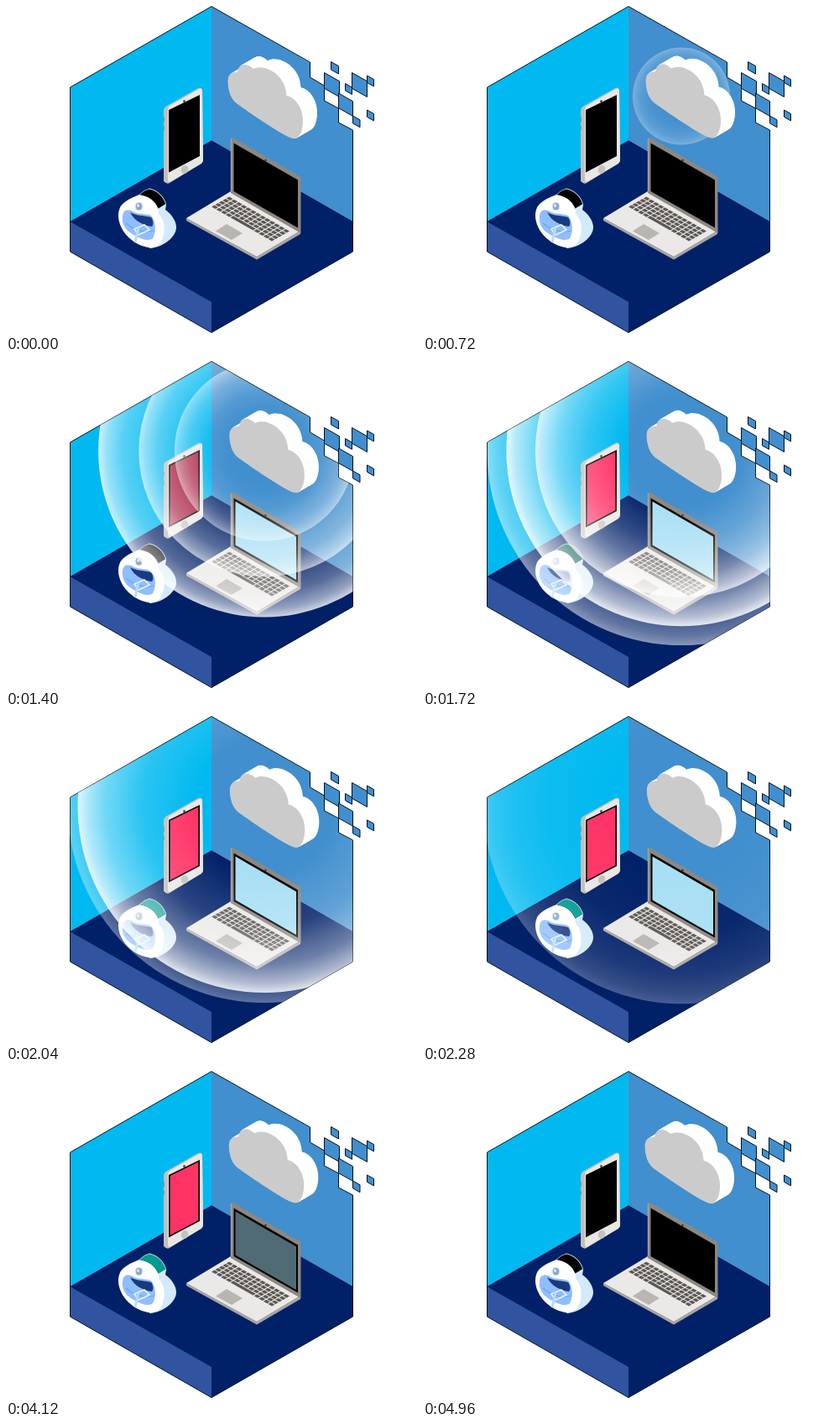
Animation, 490 px wide and 390 px high, one loop 5000 ms. Source, as an HTML page with a canvas:

```html
<!DOCTYPE html>
<html lang="en">
<head>
<meta charset="utf-8">
<title>Cloud and devices</title>
<style>
html, body { margin: 0; width: 490px; height: 390px; overflow: hidden; background: #fff; }
canvas { display: block; }
</style>
</head>
<body>
<canvas id="stage" width="490" height="390"></canvas>
<script>
const ctx = document.getElementById('stage').getContext('2d');
const LOOP = 5000;

const clamp = v => Math.max(0, Math.min(1, v));
const ramp = (t, from, to) => clamp((t - from) / (to - from));
const path = d => new Path2D(d);

function fill(shape, color, alpha = 1) {
  ctx.globalAlpha = alpha;
  ctx.fillStyle = color;
  ctx.fill(typeof shape === 'string' ? path(shape) : shape);
  ctx.globalAlpha = 1;
}

function line(shape, color, width = 1) {
  ctx.strokeStyle = color;
  ctx.lineWidth = width;
  ctx.stroke(typeof shape === 'string' ? path(shape) : shape);
}

function ellipse(x, y, rx, ry, color, turn = 0) {
  ctx.fillStyle = color;
  ctx.beginPath();
  ctx.ellipse(x, y, rx, ry, turn, 0, Math.PI * 2);
  ctx.fill();
}

// Black glass whose inner area lights up and goes dark again
function screen(glass, lit, color, t, on, off) {
  fill(glass, '#000');
  fill(lit, color, ramp(t, ...on) * (1 - ramp(t, ...off)));
}

const ROOM = path('M245 .5L362.5 67V85L379.5 95V113L396.5 122V139L413.5 148V293L245 389.5L76.5 293V97Z');
const CLOUD = path('M264.5 90C264.5 82 269 78 276 79C277 71 284 65 295 75C308 68 334 82 334.5 107' +
  'C346 109 355 124 354 139C353 153 348 161 339 157C328 153 290 127 276 117C268 112 264.5 100 264.5 90Z');

// x, y, width of the loose tiles beside the right wall
const TILES = [
  [387.5, 66.5, 9], [379.5, 79.5, 18], [412.5, 79.5, 18], [430.5, 83, 8],
  [404.5, 92.5, 8], [396.5, 104, 17], [430.5, 124, 8], [413.5, 131, 8.5]
];

function drawRoom() {
  ctx.save();
  ctx.clip(ROOM);
  fill('M245 0V160L76 257V97Z', '#00b9f0');
  fill('M245 0L414 97V257L245 160Z', '#418fce');
  fill('M245 160L414 257V293L245 390L76 257Z', '#002068');
  fill('M76 257L245 353V390L76 293Z', '#3054a0');
  ctx.restore();
  line(ROOM, '#001020');
  for (const [x, y, w] of TILES) {
    const tile = path(`M${x} ${y}l${w} ${w * .57}v${w * 1.04}l${-w} ${-w * .57}Z`);
    fill(tile, '#418fce');
    line(tile, '#001020');
  }
}

function drawPhone(t) {
  fill('M188 125Q188 121 192 119L229 98Q234 96 234 101L235 183Q235 187 231 189L195 211Q192 213 188 209Z', '#c3bfbb');
  fill('M193 124Q193 120 197 118L230 99Q234 97 234 102L235 183Q235 187 231 189L197 209Q193 211 193 207Z', '#e9e7e4');
  line('M188.5 132V138M188.5 143V148', '#96928e');
  screen('M194 124L231 106V179L194 198.5Z', 'M195.7 125L229.3 108.5V178L195.7 195.8Z',
    '#ff3366', t, [1120, 1540], [4200, 4620]);
  ellipse(212.5, 113.5, 1.3, 1.5, '#45413f');
  ellipse(213, 195, 4.2, 5, '#c5c1bd', .3);
}

function drawLaptop(t) {
  fill('M215 253L299 299L351 268V272L299 302.5L215 256Z', '#aaa5a1');
  fill('M268 221L351 268L299 299L215 253Z', '#ebe9e7');
  fill('M268 157L271 157L351.5 204V271L268 223Z', '#8d8782');
  line('M268.5 158V221', '#aaa49f', 1.4);
  screen('M271.5 163.5L348 207.5V264.5L271.5 221Z', 'M273.5 167.5L346 209.5V261L273.5 219.5Z',
    '#a9dff4', t, [780, 1180], [3880, 4340]);
  ellipse(309.5, 184, 1.2, 1.2, '#35312f');

  ctx.save();
  ctx.transform(73 / 13, 41.5 / 13, -22 / 5, 2.5, 266, 227);
  ctx.fillStyle = '#5c5753';
  for (let row = 0; row < 5; row++) {
    for (let col = 0; col < 13; col++) {
      const space = row === 4 && col > 3 && col < 9;
      if (space && col > 4) continue;
      ctx.fillRect(col + .1, row + .1, space ? 4.8 : .8, .78);
    }
  }
  ctx.restore();
  fill('M263 260L282 271L269 279L250 268.5Z', '#b9b5b1');
}

function drawWatch(t) {
  // strap side, front ring, inner strap, gap
  fill('M160 225L171 217.5C182 220 189 228 191 237L190 243C197 248 203 256 203 264C203 275 188 288 171 289Z', '#d2eafc');
  fill('M135 243C137 234 149 229 159 225C171 227 178 233 181.5 241.5L182 248C188 254 190 263 188 272' +
    'C186 283 180 289 170 288C156 286 142 275 137 263C134 256 133 249 135 243Z', '#fff');
  fill('M139 250C140 242 147 242 153 246C161 249 169 247 174 251C179 259 179 270 175 277' +
    'C168 283 152 274 144 267C140 262 138 257 139 250Z', '#8fbeff');
  fill('M148 246C154 250 165 250 173 252C176 256 176 261 174 263C165 262 153 257 148 246Z', '#1a3a80');
  line('M143 259C152 267 163 271 177 268', '#68a7ed', 1.2);
  line('M153 266L165 261L171 267L158 273Z', '#e9f5ff', 1.6);
  line('M158 264L154 282', '#b5dcff', 3);
  ellipse(158.5, 239, 5, 5.5, '#dfe8f1');
  ellipse(158.5, 239, 3.7, 4.2, '#8ba8c8');
  ellipse(157.5, 238, 1.6, 2, '#d7e7f5');
  const face = path('M159 225Q165 219 171 218C181 220 188 228 190.5 236L181.5 241.5C178 233 171 227 159 225Z');
  screen(face, face, '#009b91', t, [1480, 1900], [4500, 4920]);
  line('M159 225Q165 219 171 218C181 220 188 228 190.5 236', '#e5f3f9', .7);
}

// Grows steadily, then levels off at the walls
function waveRadius(age) {
  const x = age * .00089;
  return 241 * x / (1 + x ** 8) ** (1 / 8);
}

function drawWave(age) {
  if (age <= 0 || age >= 1500) return;
  const x = 308, y = 107.5;
  const radius = waveRadius(age);
  const glow = ctx.createRadialGradient(x, y, 0, x, y, radius);
  [[.35, 0], [.65, .12], [.85, .36], [.95, .62], [1, .85]].forEach(([at, alpha]) =>
    glow.addColorStop(at, `rgba(255,255,255,${alpha})`));
  ctx.globalAlpha = Math.min(1, .15 + age / 1200) * (1 - ramp(age, 1130, 1500));
  ctx.fillStyle = glow;
  ctx.beginPath();
  ctx.arc(x, y, radius, 0, Math.PI * 2);
  ctx.fill();
  ctx.globalAlpha = 1;
}

function drawCloud(t) {
  const drift = Math.sin(Math.PI * t / LOOP);
  ctx.save();
  ctx.translate(2.4 * drift, -1.2 * drift);
  for (let step = 34; step > 0; step--) {
    ctx.save();
    ctx.translate(step / 2, -step * .29);
    fill(CLOUD, '#fff');
    ctx.restore();
  }
  fill(CLOUD, '#cbcbcb');
  ctx.restore();
}

function draw(now) {
  const t = now % LOOP;
  ctx.fillStyle = '#fff';
  ctx.fillRect(0, 0, 490, 390);
  drawRoom();
  drawPhone(t);
  drawLaptop(t);
  drawWatch(t);
  ctx.save();
  ctx.clip(ROOM);
  for (const start of [450, 700, 900]) drawWave(t - start);
  ctx.restore();
  drawCloud(t);
}

let begin;
function frame(now) {
  begin ??= now;
  draw(now - begin);
  requestAnimationFrame(frame);
}
draw(0);
requestAnimationFrame(frame);
</script>
</body>
</html>
```
